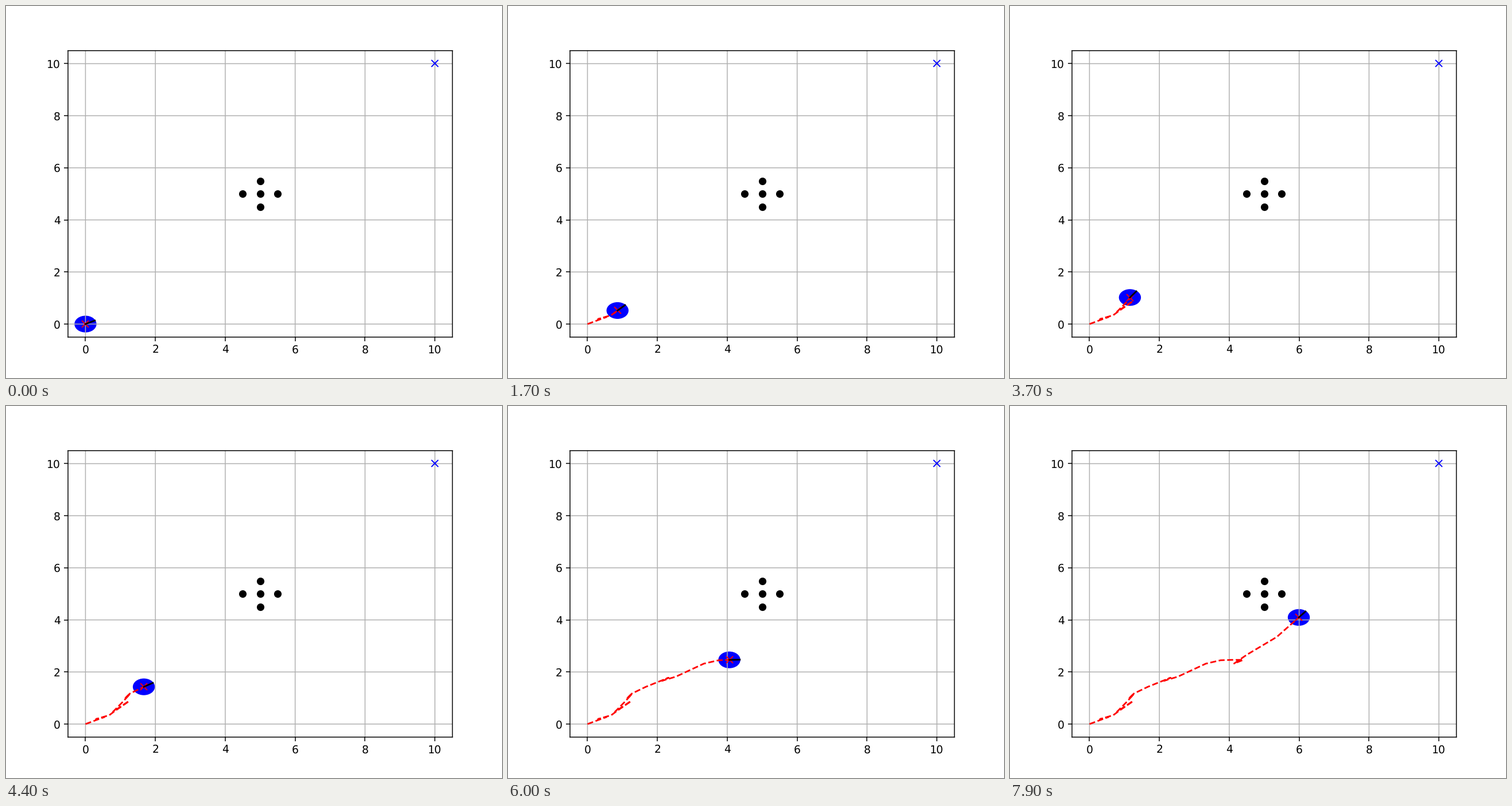
Animation of 864x648 px, one loop 8 s. Source, as a matplotlib script:

```python
import numpy as np
import matplotlib.pyplot as plt
from matplotlib.animation import FuncAnimation
from matplotlib.patches import Circle

plt.rcParams.update({"path.snap": False, "text.hinting": "none"})

FRAMES, INTERVAL = 80, 100
RADIUS = 0.3

# Turning points of the drive: step, x, y. The robot sometimes backs up.
TURNS = np.array([
    (0, 0, 0), (5, 0.54, 0.27), (9, 0.30, 0.19), (15, 0.68, 0.34),
    (17, 0.86, 0.52), (19, 1.25, 0.885), (27, 0.79, 0.475),
    (30, 1.065, 0.85), (32, 1.27, 1.15), (36, 1.12, 0.97),
    (40, 1.27, 1.17), (44, 1.67, 1.43), (47, 2.32, 1.78),
    (48, 2.13, 1.66), (50, 2.53, 1.82), (54, 3.33, 2.32),
    (57, 3.75, 2.45), (60, 4.06, 2.465), (63, 4.40, 2.465),
    (65, 4.14, 2.325), (67, 4.50, 2.66), (72, 5.36, 3.345),
    (79, 5.99, 4.095),
])


def drive():
    """Position and heading at every step."""
    steps = np.arange(FRAMES)
    key, kx, ky = TURNS.T
    # The nose keeps pointing ahead, also while reversing.
    slope = np.arctan(np.diff(ky) / np.diff(kx))
    middle = (key[1:] + key[:-1]) / 2
    return (np.interp(steps, key, kx), np.interp(steps, key, ky),
            np.interp(steps, middle, slope))


xs, ys, heading = drive()

fig, ax = plt.subplots(figsize=(6.4, 4.8), dpi=135)
ax.set(xlim=(-0.5, 10.5), ylim=(-0.5, 10.5))
ax.grid(True)

ax.plot([5, 4.5, 5.5, 5, 5], [5, 5, 5, 4.5, 5.5], "ko")
ax.plot(10, 10, "bx")
body = ax.add_patch(Circle((0, 0), RADIUS, color="b"))
trail, = ax.plot([], [], "r--")
center, = ax.plot([], [], "rx")
nose, = ax.plot([], [], "k-")


def update(i):
    x, y, a = xs[i], ys[i], heading[i]
    body.center = x, y
    trail.set_data(xs[:i + 1], ys[:i + 1])
    center.set_data([x], [y])
    nose.set_data([x, x + RADIUS * np.cos(a)], [y, y + RADIUS * np.sin(a)])
    return body, trail, center, nose


anim = FuncAnimation(fig, update, frames=FRAMES, interval=INTERVAL,
                     repeat=True, repeat_delay=0)
plt.show()
```
